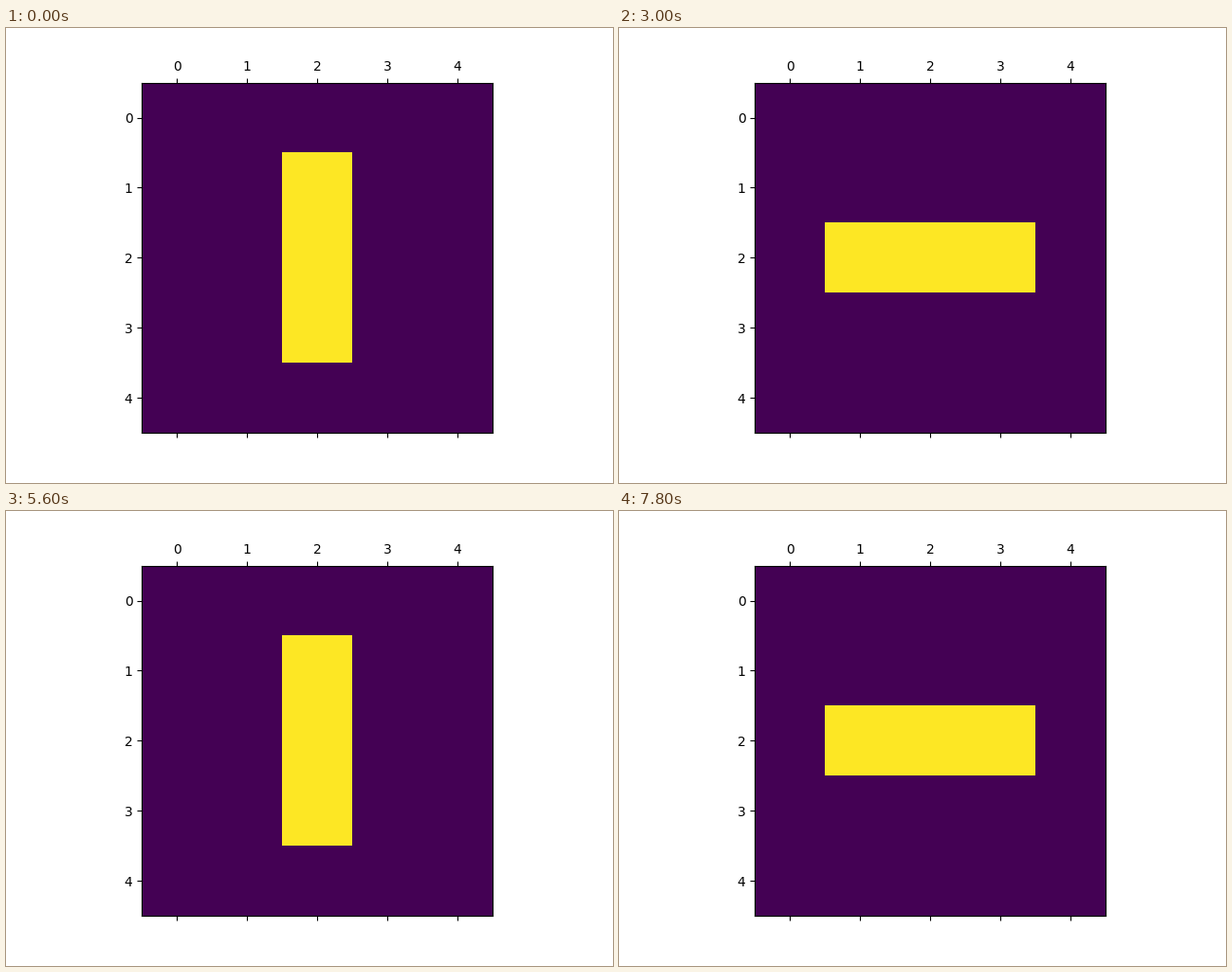
These frames come from a looping animation (640x480 px, 8 s). A matplotlib script:

```python
import numpy as np
import matplotlib.pyplot as plt
from matplotlib.animation import FuncAnimation

SIZE = 5
FRAMES = 40
INTERVAL = 200


def step(grid):
    """Advance the Game of Life by one generation on a wrapped grid."""
    shifts = [(dy, dx) for dy in (-1, 0, 1) for dx in (-1, 0, 1) if dy or dx]
    near = sum(np.roll(grid, s, axis=(0, 1)) for s in shifts)
    return ((near == 3) | ((grid == 1) & (near == 2))).astype(int)


blinker = np.zeros((SIZE, SIZE), dtype=int)
blinker[1:4, 2] = 1
generations = [blinker]
for _ in range(FRAMES - 1):
    generations.append(step(generations[-1]))

fig, ax = plt.subplots(figsize=(6.4, 4.8), dpi=100)
image = ax.matshow(blinker)


def update(i):
    image.set_data(generations[i])
    return [image]


anim = FuncAnimation(fig, update, frames=FRAMES, interval=INTERVAL,
                     repeat=True, repeat_delay=0)
plt.show()
```
